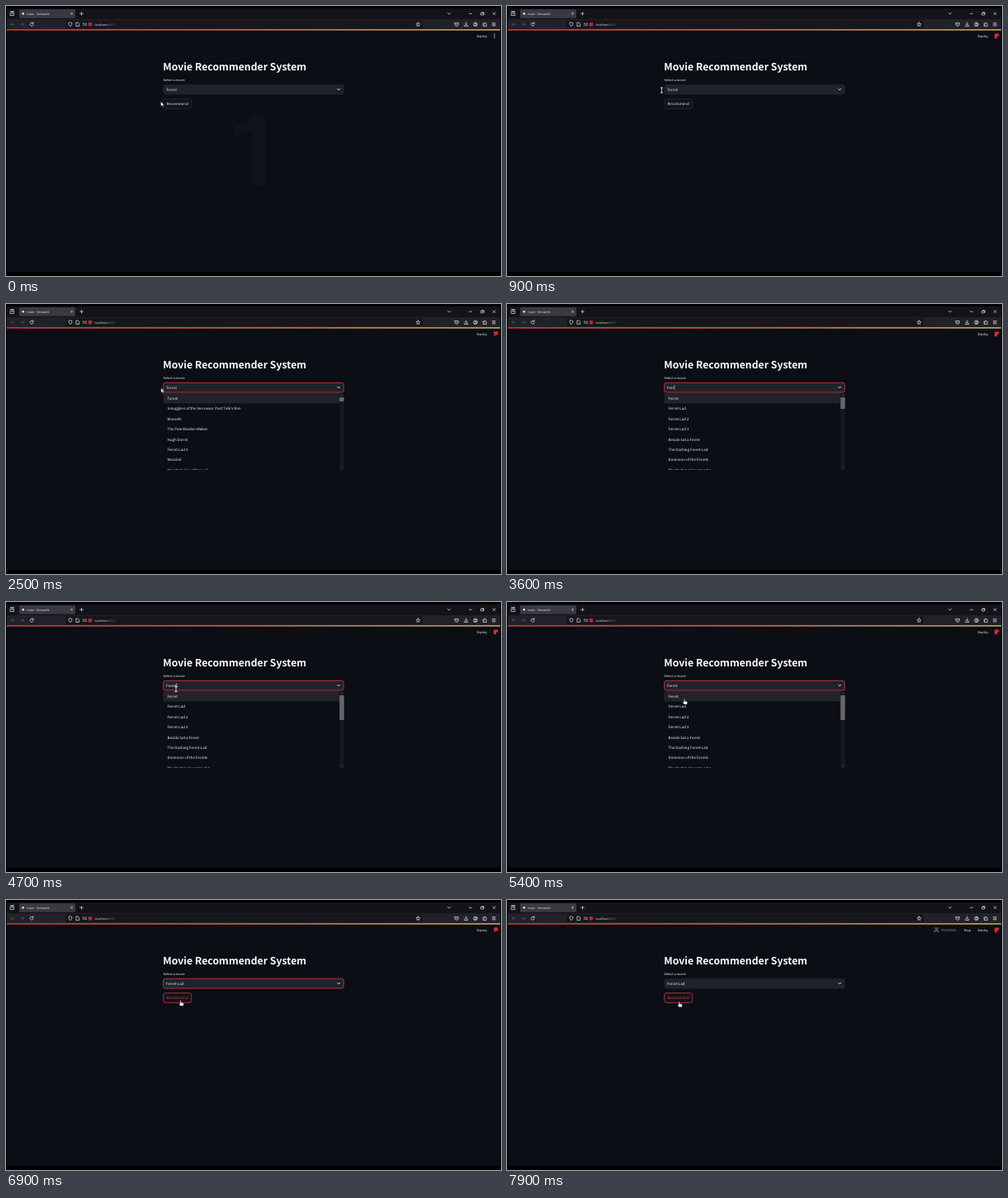
These frames come from a looping animation (600 px wide and 327 px high, 8000 ms). An HTML page:

```html
<!DOCTYPE html>
<html lang="en">
<head>
<meta charset="utf-8">
<title>Movie Recommender System</title>
<style>
  html, body { margin: 0; width: 100%; height: 100%; overflow: hidden; background: #000; }
  svg { display: block; width: 100vw; height: 100vh; }
  text { font: 4.45px "Noto Sans CJK JP", "Noto Sans CJK SC", "Noto Sans CJK", "Noto Sans", sans-serif; fill: #f0f1f4; text-rendering: geometricPrecision; white-space: pre; }
  .ui { font: 3.75px "Open Sans", "Noto Sans", sans-serif; fill: #e4e4ea; }
  .title { font-size: 12.25px; font-weight: 700; fill: #fafafa; }
  .small { font-size: 3.9px; }
  .line { fill: none; stroke: #d4d4da; stroke-width: .75; stroke-linecap: round; stroke-linejoin: round; }
  .dim { stroke: #57565f; }
  .cursor { fill: #fff; stroke: #000; stroke-width: .5; stroke-linejoin: round; }
  #field { fill: #20222b; stroke: #20222b; stroke-width: .8; }
  #field.focus { stroke: #d53c3f; }
  #button rect { fill: #10131b; stroke: #30323a; stroke-width: .7; }
  #button.hot rect { stroke: #e04245; }
  #button.hot text { fill: #e04245; }
</style>
</head>
<body>
<svg viewBox="0 0 600 327" preserveAspectRatio="none">
  <defs>
    <linearGradient id="bar">
      <stop offset="0" stop-color="#b93433"/>
      <stop offset=".45" stop-color="#c25a33"/>
      <stop offset="1" stop-color="#b3a04a"/>
    </linearGradient>
    <clipPath id="listClip"><path d="M190 108h220v93h-220z"/></clipPath>
  </defs>

  <!-- browser window -->
  <path d="M1 3h598v319H1z" fill="#0b0e15"/>
  <path d="M1 3h598v13H1z" fill="#141319"/>
  <path d="M1 16h598v12H1z" fill="#222129"/>
  <rect x="72" y="17" width="433" height="10" rx="1.5" fill="#17161d"/>
  <path d="M1 28h598v1.7H1z" fill="url(#bar)"/>
  <rect x="16" y="4" width="68" height="10.7" rx="1.5" fill="#3a3943"/>
  <circle cx="20.7" cy="9.3" r="1.3" fill="#e8e8ee"/>
  <text class="ui" x="25.2" y="10.6">main · Streamlit</text>

  <g class="line">
    <path d="M5.4 8h4.2v3.5H5.4zM5.4 6.5h4.2M7.5 8v1.5"/>
    <path d="M78.6 8.2l2 2m0-2l-2 2M89.8 9.2h3.6m-1.8-1.8V11M535.4 8.4l1.7 1.7 1.7-1.7"/>
    <path d="M561.5 9.3h3M576 8.4h2.5v2.5H576zM576.8 7.7h2.4v2.4M590.3 7.9l2.7 2.7m0-2.7l-2.7 2.7"/>
    <path class="dim" d="M10.2 22.2H6.3m1.7-1.7l-1.7 1.7L8 23.9M17.8 22.2h3.9M20 20.5l1.7 1.7-1.7 1.7"/>
    <path d="M32.8 21a2 2 0 1 0 .3 1.8M33.1 19.8v1.5h-1.5"/>
    <path d="M78 19.9l2 .7c0 2-.5 3-2 4-1.500-1-2-2-2-4zM85.300 20h2l1.300 1.300v3.200h-3.300z"/>
    <path d="M93.300 21.200h1.900m1.400 0h1M93.300 23.200h.8m1.400 0h2.100"/>
    <path d="M499.500 19.800l.7 1.600 1.700.2-1.300 1.200.4 1.700-1.500-.9-1.500.9.4-1.700-1.300-1.200 1.700-.2z"/>
    <path d="M544 20.500h4.400v1.600a2.200 2.200 0 0 1-4.400 0zM545.200 21.700l1 1 1-1"/>
    <path d="M557.700 19.800v3.200m-1.300-1.300l1.300 1.300 1.300-1.300M555.700 23.400v1.100h4v-1.100"/>
    <circle cx="569" cy="22.200" r="2.300"/><circle cx="569" cy="21.500" r=".7"/><path d="M567.600 23.700q1.400-1 2.800 0"/>
    <path d="M578.400 21.200h1.300v-1h1.100v1h1.400v3.300h-3.800v-1.200h.8v-1h-.8zM589.500 20.600h3.600M589.500 22.200h3.600M589.500 23.800h3.600"/>
  </g>
  <rect x="99.800" y="20" width="4.400" height="4.400" rx=".7" fill="#b52a2d"/>
  <text class="ui" x="107.500" y="23.600">localhost<tspan fill="#74737c">:8501</tspan></text>

  <!-- page -->
  <path id="count" d="M299 132h16v86h-16v-66l-22 6v-13q14-3 22-13z" fill="#10131a"/>
  <g id="running">
    <g class="line" style="stroke:#8d9098;stroke-width:.6">
      <circle cx="520.500" cy="34.500" r="1"/><path d="M517.800 33.400l2.700 2.600 2.700-2.600M518 39.200l2.500-3.200 2.500 3.200M517.600 37.300h5.800"/>
    </g>
    <text class="small" x="527" y="37.600" style="fill:#8d9098">RUNNING...</text>
    <text class="small" x="554" y="37.600">Stop</text>
  </g>
  <text class="small" x="570.500" y="37.600">Deploy</text>
  <g id="dots" fill="#e8e8ec"><circle cx="592" cy="34" r=".65"/><circle cx="592" cy="36.200" r=".65"/><circle cx="592" cy="38.400" r=".65"/></g>
  <path id="flag" fill="#d8292f"/>

  <text class="title" x="190.300" y="77.700">Movie Recommender System</text>
  <text class="small" x="190.500" y="91.400">Select a movie</text>
  <rect id="field" x="190.700" y="95.300" width="218.600" height="11.700" rx="2.400"/>
  <text id="value" x="194" y="102.800"></text>
  <path id="caret" d="M0 98.300v5.600" stroke="#f0f1f4" stroke-width=".6"/>
  <path class="line" d="M401.700 100.300l1.500 1.500 1.500-1.500" style="stroke:#f0f1f4;stroke-width:.9"/>
  <g id="button">
    <rect x="190.800" y="112.700" width="34" height="11.600" rx="2.400"/>
    <text x="194.500" y="120.100">Recommend</text>
  </g>

  <g id="list" clip-path="url(#listClip)">
    <path d="M190 108h220v93H190z" fill="#0b0e14"/>
    <rect id="hover" x="190.500" width="214" height="12.450" fill="#21232c"/>
    <g id="rows"></g>
    <path d="M404.300 108h5.700v93h-5.700z" fill="#15181e"/>
    <rect id="thumb" x="404.300" y="113" width="5.400" fill="#66676b"/>
    <path d="M406 110.800l1-1 1 1M406 198.200l1 1 1-1" class="line dim"/>
  </g>

  <path id="arrow" class="cursor" d="M0 0v6l1.400-1.200 1 2.200 1.100-.5-1-2.100h1.900z"/>
  <g id="beam"><path class="line" d="M-1.300-3h2.600M0-3v6M-1.300 3h2.600" style="stroke:#fff"/></g>
  <path id="hand" class="cursor" d="M-.7.500q.7-.9 1.400 0v2.100l2.500.6q.6.200.6.900l-.5 2.700H-.5L-2.200 4.300q.1-.9 1.500-.2z"/>
</svg>
<script>
const LOOP = 8000, STEP = 100, ROW = 12.45, TOP = 108;
const $ = id => document.getElementById(id);
const FIRST = "Torvel", QUERY = "Ferret", PICK = "Ferret-Lad";
const ALL = [FIRST, "Smugglers of the Verrowan: Past Tide's Rim", "Wraneth", "The Pale Warden Wakes",
  "Hugh Dorrel", "Ferret-Lad 3", "Mossled", "Marshals: Era of Drayvek"];
const FOUND = [QUERY, PICK, "Ferret-Lad 2", "Ferret-Lad 3", "Beside Sat a Ferret",
  "The Dashing Ferret-Lad", "Dominion of the Ferrets", "The Dashing Ferret-Lad 2"];
const KEYS = [2700, 3000, 3300, 3500, 4000, 4300];
const THUMB = [5, 6, 8, 11, 14, 22, 30];
// time, x, y of the pointer's hot spot
const PATH = [[0, 187.5, 115.5], [200, 187.5, 115.5], [800, 187.5, 102], [1900, 187.5, 102], [2300, 187.5, 101.5],
  [4600, 205, 104], [5100, 215, 117.3], [5400, 215, 117.3], [5600, 215, 148], [5800, 212.5, 126], [6600, 212.5, 126],
  [6900, 211.7, 121.5], [7400, 210, 122], [7600, 209, 123], [8000, 208.700, 123]];
const FLAGS = ["M591 33.500h5.300v3.200h-2.300v2.500h-3z", "M590.800 34.200l1.500-1h4v4.200h-3l-.8 1.600h-1.200l.5-2.500z"];

const rows = ALL.map((_, i) => {
  const row = document.createElementNS("http://www.w3.org/2000/svg", "text");
  row.setAttribute("x", 195.5);
  row.setAttribute("y", TOP + ROW * (i + .5) + 1.5);
  return $("rows").appendChild(row);
});

const within = (t, a, b) => t >= a && t < b;
const show = (id, on) => $(id).style.display = on ? "" : "none";
const place = (id, x, y) => $(id).setAttribute("transform", `translate(${x} ${y})`);

function pointer(t) {
  const i = PATH.findIndex(p => p[0] > t);
  const [t0, x0, y0] = PATH[i - 1], [t1, x1, y1] = PATH[i];
  const k = (t - t0) / (t1 - t0), e = k * k * (3 - 2 * k);
  return [x0 + (x1 - x0) * e, y0 + (y1 - y0) * e];
}

function draw(t) {
  const [x, y] = pointer(t);
  const typed = KEYS.filter(k => k <= t).length;
  const open = within(t, 1900, 6200);

  show("count", t < 200);
  show("dots", t < 600);
  show("flag", t >= 600);
  $("flag").setAttribute("d", FLAGS[+(within(t, 2500, 3100) || within(t, 6600, 7500))]);
  show("running", t >= 7800);

  $("value").textContent = t >= 6200 ? PICK : typed ? QUERY.slice(0, typed) : FIRST;
  $("field").classList.toggle("focus", within(t, 1900, 7800));
  show("caret", within(t, 1400, 6200) && t % 1000 > 500);
  place("caret", 194.6 + $("value").getComputedTextLength(), 0);
  $("button").classList.toggle("hot", t >= 6700);

  show("list", open);
  (typed ? FOUND : ALL).forEach((name, i) => rows[i].textContent = name);
  const over = within(t, 5100, 6200) ? Math.floor((y - TOP) / ROW) : 0;
  $("hover").setAttribute("y", TOP + ROW * over);
  $("thumb").setAttribute("height", THUMB[typed]);

  const hidden = within(t, 2700, 4600);
  const kind = t >= 4800 ? "hand" : within(t, 600, 2000) || t >= 4600 ? "beam" : "arrow";
  for (const id of ["arrow", "beam", "hand"]) {
    show(id, !hidden && id === kind);
    place(id, x, y);
  }
}

const start = performance.now();
function frame() {
  const t = (performance.now() - start) % LOOP;
  draw(Math.floor(t / STEP) * STEP);
  requestAnimationFrame(frame);
}
frame();
</script>
</body>
</html>
```
